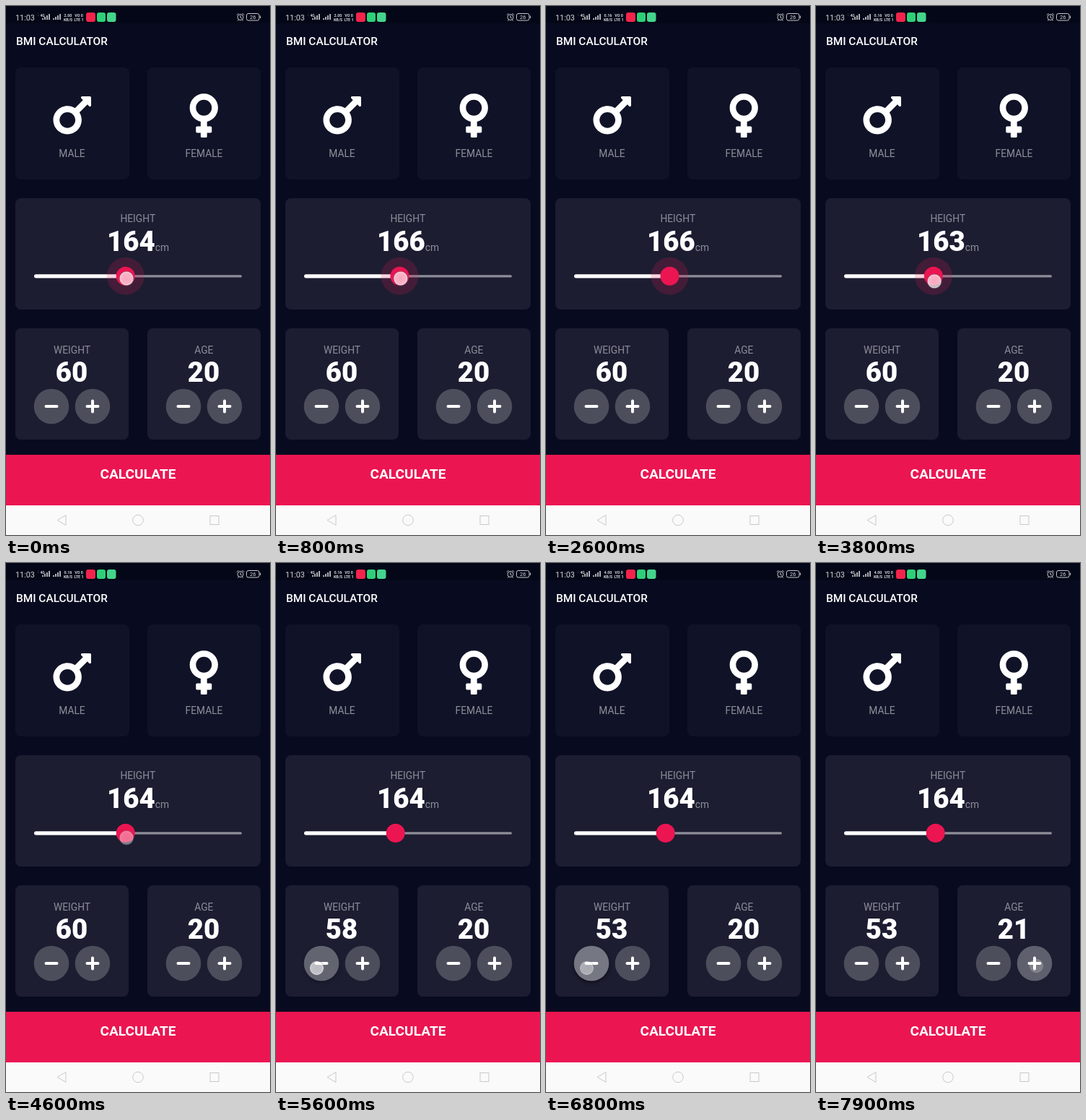
These frames come from a looping animation (366 px wide and 732 px high, 8 s). An HTML page:

```html
<!DOCTYPE html>
<html lang="en">
<head>
<meta charset="utf-8">
<title>BMI calculator</title>
<style>
html, body { margin: 0; width: 100%; height: 100%; overflow: hidden; background: #080b20; }
svg { display: block; width: 366px; height: 732px; }
text { font-family: Roboto, sans-serif; fill: #fff; }
.mid { text-anchor: middle; }
.label { font-size: 13.8px; fill: #8d8e98; }
.number { font-size: 38.4px; font-weight: 900; }
.title { font-size: 15.4px; font-weight: 500; }
.action { font-size: 19.1px; font-weight: 700; }
.card { fill: #1c1d31; }
.off { fill: #101227; }
.key { fill: #4c4e5c; }
.sign { stroke: #fff; stroke-width: 4; stroke-linecap: round; }
.status { fill: #d4d5da; }
.tiny { font-size: 5.4px; font-weight: 700; }
.nav { fill: none; stroke: #c9c9c9; }
</style>
</head>
<body>
<svg viewBox="0 0 366 732">
  <defs>
    <radialGradient id="touch">
      <stop offset="0" stop-color="#fff" stop-opacity=".62"/>
      <stop offset=".68" stop-color="#fff" stop-opacity=".68"/>
      <stop offset=".82" stop-color="#fff" stop-opacity=".8"/>
      <stop offset=".9" stop-color="#778" stop-opacity=".4"/>
      <stop offset="1" stop-color="#667" stop-opacity="0"/>
    </radialGradient>
    <filter id="soft" x="-30%" y="-30%" width="160%" height="160%"><feGaussianBlur stdDeviation="2.5"/></filter>
    <g id="bars">
      <path d="M1 19v-2M4 19v-4M7 19v-6M10 19v-8" stroke="#d4d5da" stroke-width="1.6"/>
    </g>
    <path id="minus" class="sign" d="M-7.5 0h15"/>
    <path id="plus" class="sign" d="M-7.5 0h15M0-7.5v15"/>
  </defs>

  <rect width="366" height="732" fill="#080b20"/>
  <rect width="366" height="24" fill="#040717"/>

  <g class="status">
    <text class="status" x="13" y="19.5" font-size="10.8">11:03</text>
    <text class="status" x="44" y="14" font-size="5">⁝</text>
    <text class="status" x="47.5" y="14.5" font-size="5" font-weight="700">4G</text>
    <use href="#bars" x="50"/>
    <use href="#bars" x="65"/>
    <text id="speed" class="status tiny mid" x="86" y="14.5"></text>
    <text class="status tiny mid" x="86" y="20.5">KB/S</text>
    <text class="status tiny mid" x="101" y="14.5">VO 0</text>
    <text class="status tiny mid" x="101" y="20.5">LTE 1</text>
    <rect x="111" y="9" width="13" height="13" rx="3" fill="#f2244c"/>
    <rect x="126" y="9" width="12" height="13" rx="3" fill="#2fcf78"/>
    <rect x="140" y="9" width="12.5" height="13" rx="3" fill="#43d58b"/>
    <g fill="none" stroke="#c5c6cc">
      <circle cx="325" cy="15.5" r="4"/>
      <path d="M325 13v3l2 1M320 12.5l2.5-2.5M330 12.5l-2.5-2.5M322.5 19l-1 1.5M327.5 19l1 1.5"/>
      <rect x="333.5" y="10.5" width="17.5" height="9.5" rx="2.5"/>
      <path d="M352.5 13.5v3.5"/>
    </g>
    <text class="status mid" x="342.3" y="18" font-size="7.5">26</text>
  </g>

  <text class="title" x="14" y="54">BMI CALCULATOR</text>

  <rect class="off" x="13" y="85" width="158" height="155" rx="7.7"/>
  <rect class="off" x="196" y="85" width="157" height="155" rx="7.7"/>
  <rect class="card" x="13" y="266" width="340" height="154" rx="7.7"/>
  <rect class="card" x="13" y="446" width="157" height="154" rx="7.7"/>
  <rect class="card" x="196" y="446" width="157" height="154" rx="7.7"/>

  <path fill="#fff" transform="translate(65.5 116.3) scale(.1367)" d="M372 64h-79c-10.7 0-16 12.9-8.5 20.4l16.9 16.9-80.7 80.7C198.5 167.5 172 160 144 160 64.5 160 0 224.5 0 304s64.5 144 144 144 144-64.5 144-144c0-28-8-54.5-22-76.7l80.7-80.7 16.9 16.9c7.6 7.6 20.4 2.2 20.4-8.5V76c0-6.6-5.4-12-12-12zM144 384c-44.1 0-80-35.9-80-80s35.9-80 80-80 80 35.9 80 80-35.9 80-80 80z"/>
  <g transform="translate(274.3 0)" fill="#fff">
    <circle cy="140.8" r="15.3" fill="none" stroke="#fff" stroke-width="8.7"/>
    <rect x="-4.4" y="158" width="8.8" height="24" rx="1.6"/>
    <rect x="-11" y="166.6" width="22" height="8.8" rx="1.6"/>
  </g>
  <text class="label mid" x="91.5" y="208.5">MALE</text>
  <text class="label mid" x="274.5" y="208.5">FEMALE</text>

  <text class="label mid" x="182.8" y="299">HEIGHT</text>
  <text class="mid" x="183" y="338.5"><tspan id="height" class="number"></tspan><tspan class="label">cm</tspan></text>
  <rect x="39" y="372.2" width="288" height="3.4" rx="1.7" fill="#8d8e98"/>
  <rect id="fill" x="39" y="371.2" height="5.2" rx="2.6" fill="#fff"/>
  <circle id="halo" cy="373.7" fill="#eb1555" fill-opacity=".19"/>
  <circle id="thumb" cy="373.7" r="13" fill="#eb1551"/>

  <text class="label mid" x="91.5" y="481">WEIGHT</text>
  <text class="label mid" x="274.3" y="481">AGE</text>
  <text id="weight" class="number mid" x="91" y="520.3"></text>
  <text id="age" class="number mid" x="274" y="520.3"></text>

  <circle id="shadow" cx="63" cy="556.5" r="24.5" filter="url(#soft)"/>
  <g id="keys"></g>

  <rect y="621" width="366" height="70" fill="#eb1551"/>
  <text class="action mid" x="183" y="654.4">CALCULATE</text>

  <rect y="691" width="366" height="41" fill="#fafafa"/>
  <path class="nav" d="M71 711.5l12-7v14z"/>
  <circle class="nav" cx="183" cy="711.5" r="7.3"/>
  <rect class="nav" x="283" y="705.5" width="12" height="12"/>

  <circle id="dot" r="11" fill="url(#touch)"/>
</svg>

<script>
const $ = id => document.getElementById(id);
const set = (id, attrs) => {
  for (const name in attrs) $(id).setAttribute(name, attrs[name]);
};

$('keys').innerHTML = [[63, 'minus'], [120, 'plus'], [246, 'minus'], [303, 'plus']].map(([x, sign]) =>
  `<g transform="translate(${x} 554)"><circle class="key" r="24.3"/>
   <circle id="glow${x}" r="24.3" fill="#fff" opacity="0"/><use href="#${sign}"/></g>`).join('');

// Linear interpolation through [time, value] points.
function at(points, t) {
  let prev = points[0];
  for (const next of points) {
    if (t < next[0]) {
      if (next === prev) return next[1];
      return prev[1] + (next[1] - prev[1]) * (t - prev[0]) / (next[0] - prev[0]);
    }
    prev = next;
  }
  return prev[1];
}

const LOOP = 8000, STEP = 100;
const drag = [[0, 164], [400, 165], [800, 166], [2800, 166], [3300, 193], [3700, 163], [3900, 163], [4200, 164]];
const halo = [[0, 1], [1000, 1], [1300, 0], [2300, 0], [2600, 1], [4300, 1], [4600, 0]];
const touchY = [[0, 377], [2700, 377], [3700, 381], [4700, 380]];
const touch = [[0, 1], [1000, 1], [1200, 0], [2600, 0], [2700, 1], [4500, 1], [4600, .6], [4700, 0],
  [7400, 0], [7500, .45], [7800, .45], [7900, .3]];
const minusGlow = [[5000, 0], [5200, .1], [5600, .12], [6700, .21], [6800, .23], [7100, 0]];
const plusGlow = [[7700, 0], [7800, .08], [7900, .1]];
const taps = [5200, 5500, 5800, 6100, 6300, 6500, 6700];

function tapOpacity(t) {
  if (t < 5000 || t > 7000) return 0;
  const near = Math.min(...taps.map(tap => t >= tap ? t - tap : (tap - t) / 2));
  return at([[0, .95], [100, t < 6700 ? .9 : .6], [200, .3], [300, 0]], near);
}

function draw(t) {
  const cm = Math.round(at(drag, t));
  const x = 39 + (cm - 120) * 2.88;
  $('height').textContent = cm;
  $('weight').textContent = 60 - taps.filter(tap => tap <= t).length;
  $('age').textContent = t < 7800 ? 20 : 21;
  $('speed').textContent = t < 2000 ? '2.00' : t < 6400 ? '0.16' : '4.00';

  set('fill', { width: x - 39 });
  set('thumb', { cx: x });
  set('halo', { cx: x, r: 26 * at(halo, t) });

  const press = at(minusGlow, t);
  set('glow63', { opacity: press });
  set('shadow', { opacity: press * 2 });
  set('glow303', { opacity: at(plusGlow, t) });

  const tapping = t >= 5000 && t < 7200;
  const aging = t >= 7200;
  set('dot', {
    cx: aging ? 305.5 : tapping ? 56.5 : x + 1.3,
    cy: aging ? 557.5 : tapping ? 560.5 : at(touchY, t),
    opacity: tapping ? tapOpacity(t) : at(touch, t)
  });
}

function tick() {
  const t = performance.now() % LOOP;
  draw(Math.floor(t / STEP) * STEP);
  requestAnimationFrame(tick);
}
tick();
</script>
</body>
</html>
```
